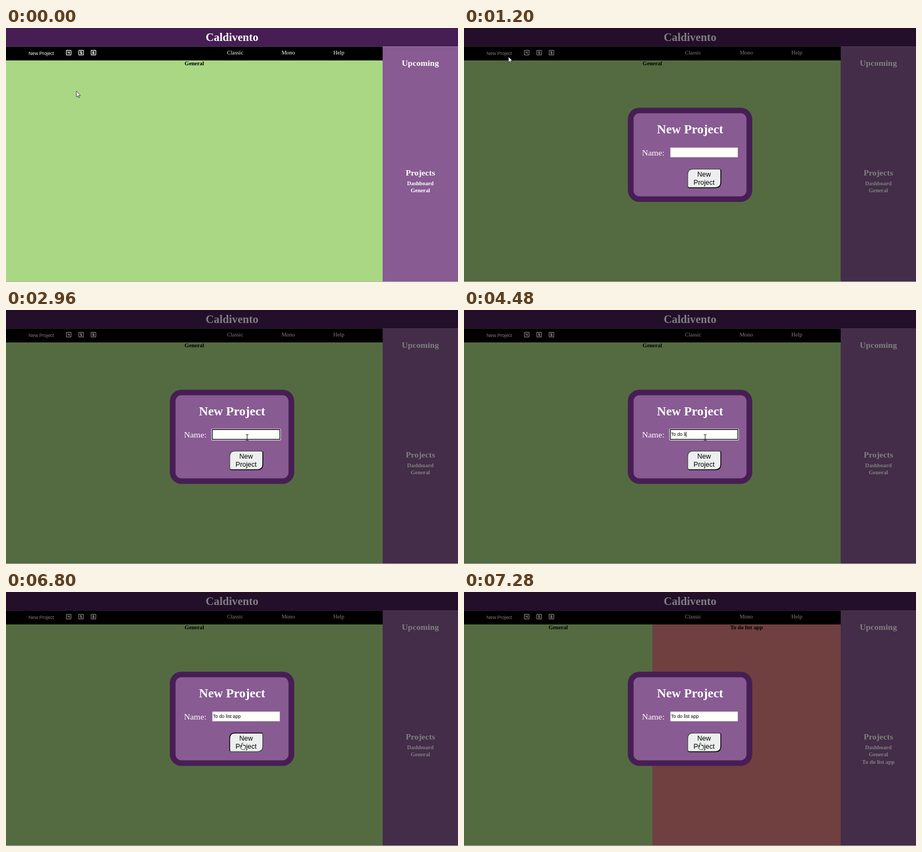
Recreate the animation shown at these times as an HTML page. Size 834 by 470 pixels, loop 7440 ms.

```html
<!DOCTYPE html>
<html lang="en">
<head>
<meta charset="utf-8">
<title>Project board</title>
<style>
html, body { margin: 0; width: 100%; height: 100%; overflow: hidden; background: #fff; }
svg { display: block; width: 100vw; height: 100vh; }
text { font: 10.4px "Liberation Serif", "Times New Roman", serif; fill: #fff; text-anchor: middle; white-space: pre; }
.b { font-weight: bold; }
.h1 { font-size: 20.8px; }
.h2 { font-size: 15.6px; }
.big { font-size: 23.4px; }
.ink { fill: #000; }
.sans { font-family: "Liberation Sans", Arial, sans-serif; font-size: 8.667px; }
.btn { font-size: 12.48px; }
.left { text-anchor: start; }
.line { fill: none; stroke: #fff; stroke-width: 1.2; }
.edge { fill: none; stroke-width: 1.5; }
.cursor { fill: #fff; stroke: #000; stroke-width: .7; stroke-linejoin: round; }
</style>
</head>
<body>
<svg viewBox="0 0 834 470" preserveAspectRatio="none">
  <rect width="834" height="34.3" fill="#461e54"/>
  <rect y="34.3" width="695" height="25.7" fill="#000"/>
  <rect x="695" y="34.3" width="139" height="434.7" fill="#885b92"/>
  <rect y="60" width="695" height="409" fill="#a9d784"/>
  <rect id="column" x="347.5" y="60" width="347.5" height="409" fill="#e27e82"/>

  <text class="b h1" x="417" y="24.4">Caldivento</text>
  <text class="sans" x="65.2" y="50">New Project</text>
  <g class="line">
    <g transform="translate(115.7 45.6)"><rect x="-4.3" y="-4.3" width="8.6" height="8.6" rx=".6"/><path d="M-1.3-2.3V.3H1.3M1.3-2.3V2.4"/></g>
    <g transform="translate(138.6 45.6)"><rect x="-4.3" y="-4.3" width="8.6" height="8.6" rx=".6"/><path d="M1.6-2H-1.2V0H1.2V2H-1.6"/></g>
    <g transform="translate(161.4 45.6)"><rect x="-4.3" y="-4.3" width="8.6" height="8.6" rx=".6"/><path d="M1.6-2H-1.2V2H1.2V0H-1.2"/></g>
  </g>
  <text x="422.8" y="48.7">Classic</text>
  <text x="520.8" y="48.7">Mono</text>
  <text x="614" y="48.7">Help</text>
  <text class="b ink" id="first" x="347.5" y="69.2">General</text>
  <text class="b ink" id="second" x="521.2" y="69.2">To do list app</text>
  <text class="b h2" x="764.6" y="70">Upcoming</text>
  <text class="b h2" x="764.6" y="272.6">Projects</text>
  <text class="b" x="764.6" y="290.6">Dashboard</text>
  <text class="b" x="764.6" y="304.4">General</text>
  <text class="b" id="entry" x="764.6" y="318.2">To do list app</text>

  <g id="modal">
    <rect width="834" height="469" fill="#000" opacity=".5"/>
    <rect x="302.2" y="147.4" width="229.7" height="174.4" rx="21.5" fill="#461e54"/>
    <rect x="312.8" y="157.8" width="208.5" height="153.6" rx="10.6" fill="#885b92"/>
    <text class="b big" x="417.2" y="195">New Project</text>
    <text class="h2" x="349.2" y="235.6">Name:</text>
    <rect x="380.8" y="221.4" width="124.4" height="17.8" fill="#fffffa"/>
    <g id="ring" fill="none">
      <rect x="379.4" y="220" width="127.2" height="20.6" rx="1" stroke="#fff" stroke-width="1.2"/>
      <rect x="380.6" y="221.2" width="124.8" height="18.2" stroke="#000" stroke-width="1.4"/>
    </g>
    <text class="sans ink left" id="typed" x="382" y="233.2"></text>
    <rect id="caret" y="225.4" width=".9" height="10"/>
    <path d="M422.5 261H470.5Q473.8 261 473.8 264.3V285.5Q473.8 295.4 464 295.4H416Q412.7 295.4 412.7 292V271Q412.7 261 422.5 261Z" fill="#ecefed"/>
    <path id="lit" class="edge" d="M413.5 294.5Q412.7 293.7 412.7 292V271Q412.7 261 422.5 261H470.5Q472.2 261 473 261.8"/>
    <path id="shade" class="edge" d="M473 261.8Q473.8 262.6 473.8 264.3V285.5Q473.8 295.4 464 295.4H416Q414.3 295.4 413.5 294.5"/>
    <text class="sans btn ink" x="443" y="275.3">New</text>
    <text class="sans btn ink" x="443" y="289.5">Project</text>
  </g>
  <rect y="469" width="834" height="1" fill="#b0b0b0"/>

  <g id="pointer">
    <path id="arrow" class="cursor" d="M0 0V10.6L2.4 8.4 4 12 5.7 11.3 4.1 7.8H7.4Z"/>
    <path id="hand" class="cursor" d="M-1.1 1Q0-.6 1.1 1V4.4L4.8 5.4Q6 5.9 5.8 8L4.6 12.6H-.8L-4 8.2Q-3.7 6.6-2.4 7.4L-1.1 8.5Z"/>
    <path id="beam" fill="none" stroke="#000" stroke-width="1" d="M-2.5-5.3H-.6L0-4.8.6-5.3H2.5M0-4.8V4.8M-2.5 5.3H-.6L0 4.8.6 5.3H2.5"/>
  </g>
</svg>
<script>
const LOOP = 7440, TICK = 80;
const OPEN = 1200, FOCUS = 2080, PRESS = 6720, DONE = 6880;
const NAME = "To do list app";
const KEYS = [3600, 3680, 3760, 3920, 4080, 4160, 4320, 4480, 4720, 4800, 4960, 5120, 5200, 5360];
// time, x, y of the pointer
const PATH = [
  [0, 130, 117], [160, 124, 109], [480, 92, 70], [800, 71, 44], [1120, 71, 44],
  [1200, 82, 53], [1480, 225, 142], [1760, 380, 218], [2000, 445, 236],
  [6240, 445, 236], [6400, 436, 279], [LOOP, 436, 279]
];

const el = id => document.getElementById(id);
const show = (id, on) => el(id).style.display = on ? "" : "none";
const inside = (x, y, l, t, r, b) => x > l && x < r && y > t && y < b;

function pointAt(t) {
  const i = Math.max(1, PATH.findIndex(p => p[0] >= t));
  const [t0, x0, y0] = PATH[i - 1], [t1, x1, y1] = PATH[i];
  const k = (t - t0) / (t1 - t0);
  return [x0 + (x1 - x0) * k, y0 + (y1 - y0) * k];
}

function cursorKind(x, y, open) {
  if (!open) return inside(x, y, 38, 38, 92, 55) ? "hand" : "arrow";
  if (inside(x, y, 380, 220, 506, 241)) return "beam";
  return inside(x, y, 412, 260, 474, 296) ? "hand" : "arrow";
}

function stepped(t) {
  const n = Math.floor(t / TICK);
  return (n % 5 === 3 ? n - 1 : n) * TICK;
}

function draw(t) {
  const open = t >= OPEN, done = t >= DONE;
  const focused = t >= FOCUS && t < PRESS;
  const pressed = t >= PRESS && !done;

  show("modal", open);
  for (const id of ["column", "second", "entry"]) show(id, done);
  el("first").setAttribute("x", done ? 173.8 : 347.5);

  const count = KEYS.filter(k => k <= t).length;
  const since = t - (count ? KEYS[count - 1] : FOCUS);
  const typed = el("typed");
  typed.textContent = NAME.slice(0, count);
  show("ring", focused);
  show("caret", focused && since % 1000 < 500);
  el("caret").setAttribute("x", 382 + (open && count ? typed.getComputedTextLength() : 0));

  el("lit").style.stroke = pressed ? "#000" : "#4c4c4c";
  el("shade").style.stroke = pressed ? "#4c4c4c" : "#000";

  const [x, y] = pointAt(t), kind = cursorKind(x, y, open);
  for (const id of ["arrow", "hand", "beam"]) show(id, id === kind);
  el("pointer").setAttribute("transform", `translate(${x} ${y})`);
}

const start = performance.now();
function frame() {
  draw(stepped((performance.now() - start) % LOOP));
  requestAnimationFrame(frame);
}
frame();
</script>
</body>
</html>
```
